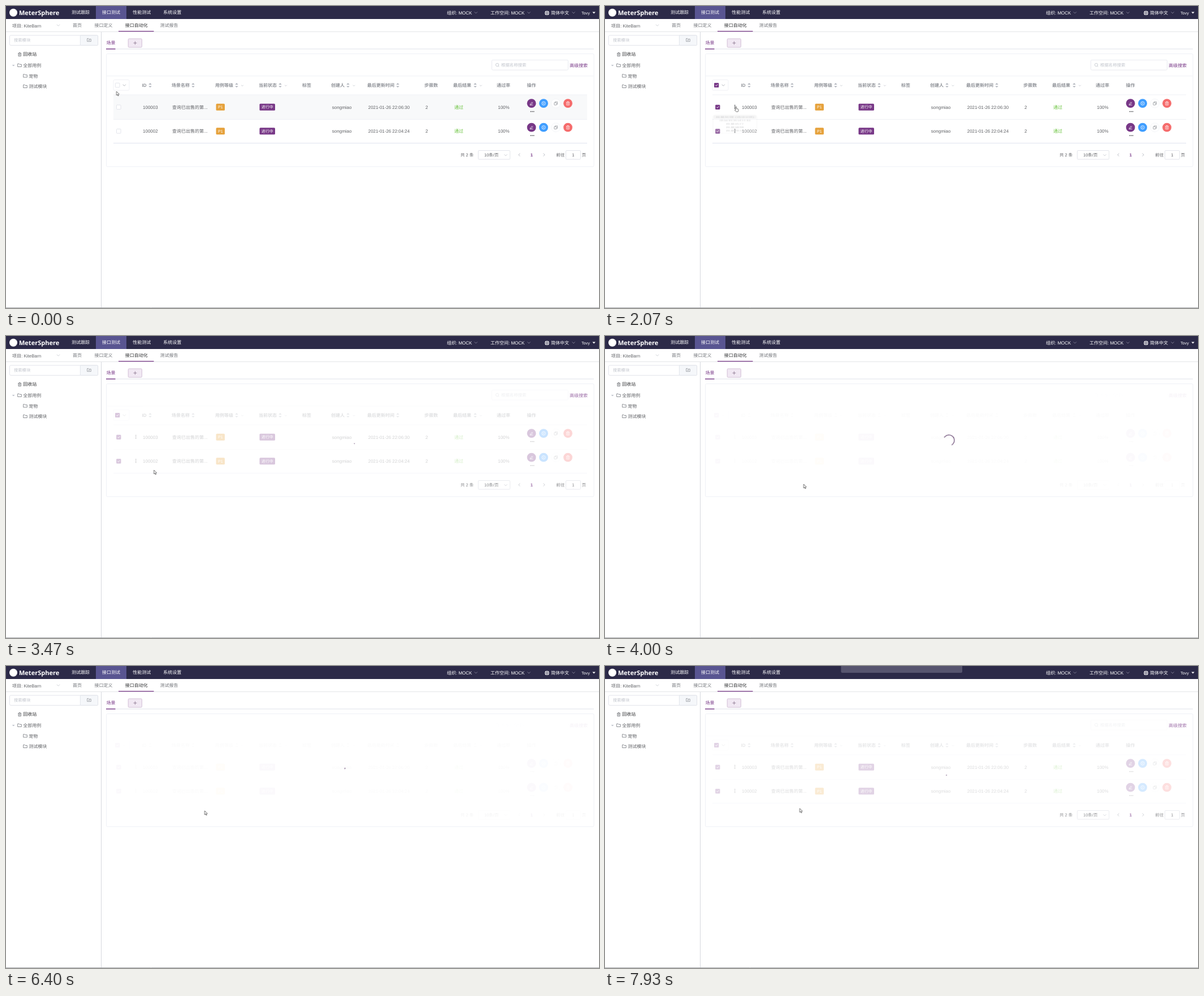
Animation, 1049 px wide and 534 px high, one loop 8 s. Source, as an HTML page:

```html
<!DOCTYPE html>
<html lang="zh-CN">
<head>
<meta charset="utf-8">
<title>接口自动化</title>
<style>
html, body { margin: 0; width: 100%; height: 100%; overflow: hidden; background: #fff; }
svg { display: block; width: 100%; height: 100%; }
text {
  font-family: "Liberation Sans", "Noto Sans CJK SC", "Noto Sans CJK", sans-serif;
  text-rendering: geometricPrecision; white-space: pre;
}
.brand { font-family: "Noto Sans", "Open Sans", sans-serif; }
.a { animation: 8s linear infinite both; }
.step { animation-timing-function: step-end; }

@keyframes cursor {
  0%, .8% { transform: translate(195.4px, 151px); }
  4.125%, 8.375% { transform: translate(198px, 142px); }
  12.5% { transform: translate(219.4px, 159px); }
  14.125%, 18.375% { transform: translate(229.4px, 177px); }
  20.875%, 26.6% { transform: translate(231.8px, 178px); }
  33.3%, 40% { transform: translate(232.2px, 238.3px); }
  43.375% { transform: translate(261.5px, 237px); }
  50%, 50.9% { transform: translate(351.4px, 262px); }
  55%, 83.375% { transform: translate(351.4px, 256px); }
  93.4% { transform: translate(346.4px, 253px); }
  99.1%, 100% { transform: translate(344.4px, 251.7px); }
}
@keyframes hand {
  0%, 9.2%, 40.9%, 100% { opacity: 0; }
  3.4%, 18.4% { opacity: 1; }
}
@keyframes arrow {
  0%, 9.2%, 40.9%, 100% { opacity: 1; }
  3.4%, 18.4% { opacity: 0; }
}
@keyframes allOn { 0%, 5.8% { opacity: 0; } 6.6%, 100% { opacity: 1; } }
@keyframes rowsOn { 0% { opacity: 0; } 8.34%, 100% { opacity: 1; } }
@keyframes rowHover { 0% { opacity: 1; } 8.34%, 100% { opacity: 0; } }
@keyframes menu {
  0%, 24.9% { opacity: 0; transform: scaleY(.1); }
  28.2%, 40% { opacity: 1; transform: none; }
  42.5%, 100% { opacity: 0; transform: none; }
}
@keyframes firstItem { 0%, 32.1%, 100% { opacity: 0; } 30.4% { opacity: 1; } }
@keyframes secondItem { 0%, 42.5%, 100% { opacity: 0; } 32.1% { opacity: 1; } }
@keyframes table {
  0%, 40.9% { opacity: 1; }
  43.375% { opacity: .28; }
  45.5% { opacity: .06; }
  50%, 98.3% { opacity: .03; }
  99.1%, 100% { opacity: .22; }
}
@keyframes pager {
  0%, 40.9% { opacity: 1; }
  43.375% { opacity: .75; }
  46% { opacity: .1; }
  50%, 98.3% { opacity: .07; }
  99.1%, 100% { opacity: .7; }
}
@keyframes loading { 0%, 40.9% { opacity: 0; } 43.3%, 100% { opacity: 1; } }
@keyframes turn { from { transform: rotate(133deg); } to { transform: rotate(1573deg); } }
@keyframes dash {
  0%, 24.875%, 43.635%, 62.385%, 81.135% { stroke-dasharray: 1, 200; stroke-dashoffset: 0; }
  34.25%, 53%, 71.75%, 90.5% { stroke-dasharray: 90, 150; stroke-dashoffset: -35; }
  43.625%, 62.375%, 81.125%, 99.875%, 100% { stroke-dasharray: 90, 150; stroke-dashoffset: -124; }
}
@keyframes toast {
  0%, 98.3% { opacity: 0; transform: translateY(-1px); }
  99.1%, 100% { opacity: .22; transform: none; }
}
</style>
</head>
<body>
<svg id="stage" viewBox="0 0 1049 534" xmlns="http://www.w3.org/2000/svg"></svg>
<script>
const PURPLE = '#783887', TEXT = '#606266', MUTED = '#909399', PALE = '#c0c4cc', LINE = '#e2e5ec', DARK = '#303133';

// y is the middle of the line
const text = (x, y, s, fill = TEXT, size = 8, more = '') =>
  `<text x="${x}" y="${y + size * .37}" font-size="${size}" fill="${fill}" ${more}>${s}</text>`;
const mid = 'text-anchor="middle"';
const bold = 'font-weight="700"';
const rect = (x, y, w, h, fill, r = 0, stroke = 'none') =>
  `<rect x="${x}" y="${y}" width="${w}" height="${h}" rx="${r}" fill="${fill}" stroke="${stroke}" stroke-width=".8"/>`;
const path = (d, stroke, width = .8, fill = 'none') =>
  `<path d="${d}" fill="${fill}" stroke="${stroke}" stroke-width="${width}" stroke-linejoin="round"/>`;
const hline = (x1, x2, y, color, w = 1) => path(`M${x1} ${y}H${x2}`, color, w);
const chevron = (x, y, color = PALE, w = 2.6) => path(`M${x - w} ${y - w / 2}l${w} ${w} ${w} ${-w}`, color);
const anim = (name, body, cls = '', style = '') =>
  `<g class="a ${cls}" style="animation-name:${name};${style}">${body}</g>`;

const folder = (x, y, c = '#70747a') =>
  path(`M${x - 3.3} ${y - 2.5}h2.3l1 1h3.3v4.2h-6.6z`, c, .8);
const trash = (x, y, c) =>
  path(`M${x - 2.9} ${y - 2}h5.8M${x - 1} ${y - 2}v-1.1h2v1.1M${x - 2.2} ${y - 2}v5h4.4v-5M${x - .7} ${y - .5}v2M${x + .7} ${y - .5}v2`, c, .7);
const lens = (x, y) => `<circle cx="${x}" cy="${y}" r="2.7" fill="none" stroke="${PALE}" stroke-width=".8"/>`
  + path(`M${x + 2} ${y + 2}l1.3 1.3`, PALE);
const sorter = x => `<path d="M${x - 2.8} 139l2.8-2.7 2.8 2.7zM${x - 2.8} 141.4l2.8 2.7 2.8-2.7z" fill="#aeb2ba"/>`;
const box = (x, y) => rect(x - 3.8, y - 3.8, 7.6, 7.6, '#fff', 1, '#dcdfe6');
const ticked = (x, y) => rect(x - 4.1, y - 4.1, 8.2, 8.2, PURPLE, 1.2)
  + path(`M${x - 2} ${y}l1.5 1.5 2.6-3`, '#fff', .9);
const dots = (x, y, dx, dy) => [-1, 0, 1].map(i =>
  `<circle cx="${x + i * dx}" cy="${y + i * dy}" r=".9" fill="#44464a"/>`).join('');

function topBar() {
  const tabs = ['测试跟踪', '接口测试', '性能测试', '系统设置'];
  return rect(0, 0, 1049, 23, '#2c2a48') + rect(159, 0, 54, 23, '#595591')
    + '<circle cx="13" cy="11.7" r="7" fill="#fff"/>'
    + '<text class="brand" x="23" y="16" font-size="11" font-weight="700" fill="#fff">MeterSphere</text>'
    + tabs.map((s, i) => text(116 + 54.1 * i, 11, s, '#fff')).join('')
    + text(780, 11.7, '组织: MOCK', '#fff') + chevron(831.3, 11.7, '#8f8da3')
    + text(857, 11.7, '工作空间: MOCK', '#fff') + chevron(925, 11.7, '#8f8da3')
    + '<circle cx="957" cy="12.4" r="3.8" fill="#fff"/>'
    + path('M953.2 12.4h7.6M957 8.6v7.6M957 8.6q-4 3.8 0 7.6q4-3.8 0-7.6', '#2c2a48', .6)
    + text(964, 12.2, '简体中文', '#fff') + chevron(1004, 11.7, '#8f8da3')
    + text(1018, 12, 'Tovy', '#fff', 7.2)
    + '<path d="M1037.3 10.6h5.4l-2.7 3z" fill="#fff"/>';
}

function subBar() {
  return hline(0, 1049, 45.5, '#e4e5e8')
    + text(11, 35, '项目: KiteBarn') + chevron(92.5, 34)
    + text(118, 34, '首页', '#6f7277') + text(156.5, 34, '接口定义', '#6f7277')
    + text(210.7, 34, '接口自动化', DARK) + text(272.5, 34, '测试报告', '#6f7277')
    + hline(199, 261.5, 44.7, PURPLE, 1.2);
}

function sidebar() {
  return path('M168.5 46V533', '#d5d8de', 1)
    + rect(6.4, 51.9, 156.2, 17.6, '#fff', 2, '#dcdfe6') + rect(131.4, 51.9, 31.2, 17.6, '#f5f7fa', 1, '#dcdfe6')
    + text(14, 60.5, '搜索模块', PALE, 7.3)
    + folder(147, 60, MUTED) + path('M147 59.1v2.6M145.7 60.4h2.6', MUTED, .6)
    + trash(24.2, 85.7, '#55585d') + text(30.3, 85.5, '回收站', DARK)
    + `<path d="M10.8 104h4.8l-2.4 2.6z" fill="${PALE}"/>`
    + folder(24, 104.7) + text(30.3, 105.2, '全部用例')
    + folder(34, 123.3) + text(40.3, 123.9, '宠物')
    + folder(34, 141.9) + text(40.3, 142.4, '测试模块');
}

function tabsAndCard() {
  return text(177.5, 65.3, '场景', PURPLE)
    + hline(177, 1040, 76, '#dfe2e9') + hline(177, 193.5, 76, PURPLE, 1.4)
    + rect(216.2, 57.9, 24.2, 15.2, '#f1e8f3', 1.6, '#c9b4cf')
    + path('M225.4 65.4h6M228.4 62.4v6', '#7a6580', .7)
    + rect(177.5, 84.5, 862.5, 199.5, '#fff', 2, '#ebeef4');
}

function headings() {
  // title, x, sorter x, filter x
  const cols = [['ID', 240.6, 255], ['场景名称', 293, 331], ['用例等级', 370, 408, 418],
    ['当前状态', 447, 485, 495], ['标签', 524], ['创建人', 575, 605, 615.5], ['最后更新时间', 639, 693],
    ['步骤数', 740], ['最后结果', 791, 830, 840], ['通过率', 868], ['操作', 921.5]];
  return rect(190, 130.5, 28, 18.6, '#fff', 2, '#eceef3') + box(197.2, 140) + chevron(209.3, 140, '#a4a8af')
    + cols.map(([s, x, sort, filter]) => text(x, 140.4, s, MUTED, 8, bold)
      + (sort ? sorter(sort) : '') + (filter ? chevron(filter, 140.7, PALE, 1.8) : '')).join('');
}

function button(x, y, fill, icon, stroke = 'none') {
  return `<circle cx="${x}" cy="${y}" r="7.9" fill="${fill}" stroke="${stroke}" stroke-width=".6"/>` + icon;
}

function row(y, id, time) {
  const b = y - 6.6;
  return box(199.3, y)
    + text(242, y, id) + text(294, y, '查询已出售的第...')
    + rect(371.6, y - 6, 15.4, 12, '#e6a23c', 1.6) + text(379.3, y, 'P1', '#fff', 7, mid)
    + rect(448.5, y - 6, 27.5, 12, PURPLE, 1.6) + text(462.2, y, '进行中', '#fff', 7, mid)
    + text(576.8, y, 'songmiao') + text(640.8, y, time, TEXT, 7.9)
    + text(742, y, '2') + text(793, y, '通过', '#67c23a') + text(870.2, y, '100%')
    + button(929.6, b, PURPLE, path(`M927.4 ${b + 1.2}l3-3.4 1.4 1.2-3 3.2-1.6.4zM926.9 ${b + 2.9}h5.4`, '#fff', .7))
    + button(951, b, '#409eff', `<circle cx="951" cy="${b}" r="3.1" fill="none" stroke="#fff" stroke-width=".8"/>`
      + path(`M950.2 ${b - 1.3}v2.6l2-1.3z`, '#fff', .5))
    + button(972.6, b, '#fff', rect(969.8, b - 1.3, 4.2, 4.2, '#fff', .4, MUTED)
      + path(`M971.2 ${b - 1.3}v-1.5h4.3v4.3h-1.5`, MUTED, .7), '#eceef3')
    + button(994, b, '#f56c6c', trash(994, b, '#fff'))
    + dots(931, y + 7.8, 2.6, 0);
}

function table() {
  const ys = [178.8, 221.3];
  return hline(178, 1039.5, 123.8, '#eff1f5')
    + rect(859.4, 95.4, 135, 17.8, '#fff', 2, LINE) + lens(869, 104) + text(876, 104.3, '根据名称搜索', PALE, 7.4)
    + anim('rowHover', rect(190, 157, 838, 44, '#f8f9fa'), 'step')
    + hline(190, 1028, 157, '#eff1f5') + hline(190, 1028, 200.5, '#eff1f5') + hline(190, 1028, 242.5, '#dfe3ef')
    + headings()
    + row(ys[0], '100003', '2021-01-26 22:06:30')
    + row(ys[1], '100002', '2021-01-26 22:04:24')
    + anim('allOn', ticked(197.2, 140))
    + anim('rowsOn', ys.map(y => ticked(199.3, y) + dots(229.7, y - .5, 0, 2.6)).join(''), 'step');
}

function pager() {
  const y = 263.2;
  return text(997, 104.8, '高级搜索', PURPLE)
    + text(804, y, '共 2 条', TEXT, 7.5)
    + rect(835.4, 255.5, 56.2, 15.6, '#fff', 1.6, '#dcdfe6') + text(846, y, '10条/页', TEXT, 7.5) + chevron(884, y + .4)
    + path('M909.2 260.6l-2.4 2.5 2.4 2.5M950.6 260.6l2.4 2.5-2.4 2.5', '#a9adb5')
    + text(929.8, y, '1', PURPLE, 7.5, bold + ' ' + mid)
    + text(973.3, y, '前往', TEXT, 7.5)
    + rect(990.4, 255.5, 26, 15.6, '#fff', 1.6, '#dcdfe6') + text(1003.4, y, '1', TEXT, 7.5, mid)
    + text(1018.6, y, '页', TEXT, 7.5);
}

function menu() {
  const items = ['添加到测试计划', '批量执行', '批量编辑', '批量移动'];
  const itemY = i => 217.6 + 16.75 * i;
  const label = (i, color) => text(229.8, itemY(i), items[i], color, 8, mid);
  const lit = i => rect(192, itemY(i) - 8.3, 75.6, 16.7, '#f1ebf3') + label(i, PURPLE);
  return '<rect x="192" y="193" width="75.6" height="85" rx="1.5" fill="#fff" filter="url(#shade)"/>'
    + rect(192, 193, 75.6, 16.4, '#dcdcdd', 1) + text(229.8, 201.4, '批量处理 (选中2项)', TEXT, 8, mid)
    + items.map((s, i) => label(i, TEXT)).join('')
    + anim('firstItem', lit(0), 'step') + anim('secondItem', lit(1), 'step');
}

const spinner = '<g transform="translate(608.5 184.5) scale(.48)">' + anim('turn',
  '<circle class="a" style="animation-name:dash;animation-timing-function:ease-in-out" r="20" fill="none" stroke="#4f2a5c" stroke-width="2.2" stroke-linecap="round"/>') + '</g>';

const pointer = anim('arrow', path('M0 0V6.9L1.6 5.5 2.7 8 3.8 7.5 2.8 5.1 4.9 4.9z', '#333', .7, '#fff'), 'step')
  + anim('hand', path('M-.9 5V.8a.9.9 0 0 1 1.8 0V3.6l2.5.6q1 .3.9 1.2l-.5 2.5q-.2 1.1-1 1.1H.4L-2.3 6.2q.1-1.1 1.4-.2z', '#333', .7, '#fff'), 'step');

document.getElementById('stage').innerHTML =
  '<defs><filter id="shade" x="-20%" y="-20%" width="140%" height="140%"><feDropShadow dx="0" dy="1" stdDeviation="2.5" flood-color="#000" flood-opacity=".16"/></filter></defs>'
  + topBar() + subBar() + sidebar() + tabsAndCard()
  + anim('table', table()) + anim('pager', pager())
  + anim('loading', spinner)
  + hline(0, 1049, 533.5, '#a9abae')
  + anim('menu', menu(), '', 'transform-origin:0 193px')
  + anim('toast', rect(417.5, -15, 214.5, 27, '#f0f2f8', 2.2))
  + anim('cursor', pointer);
</script>
</body>
</html>
```
